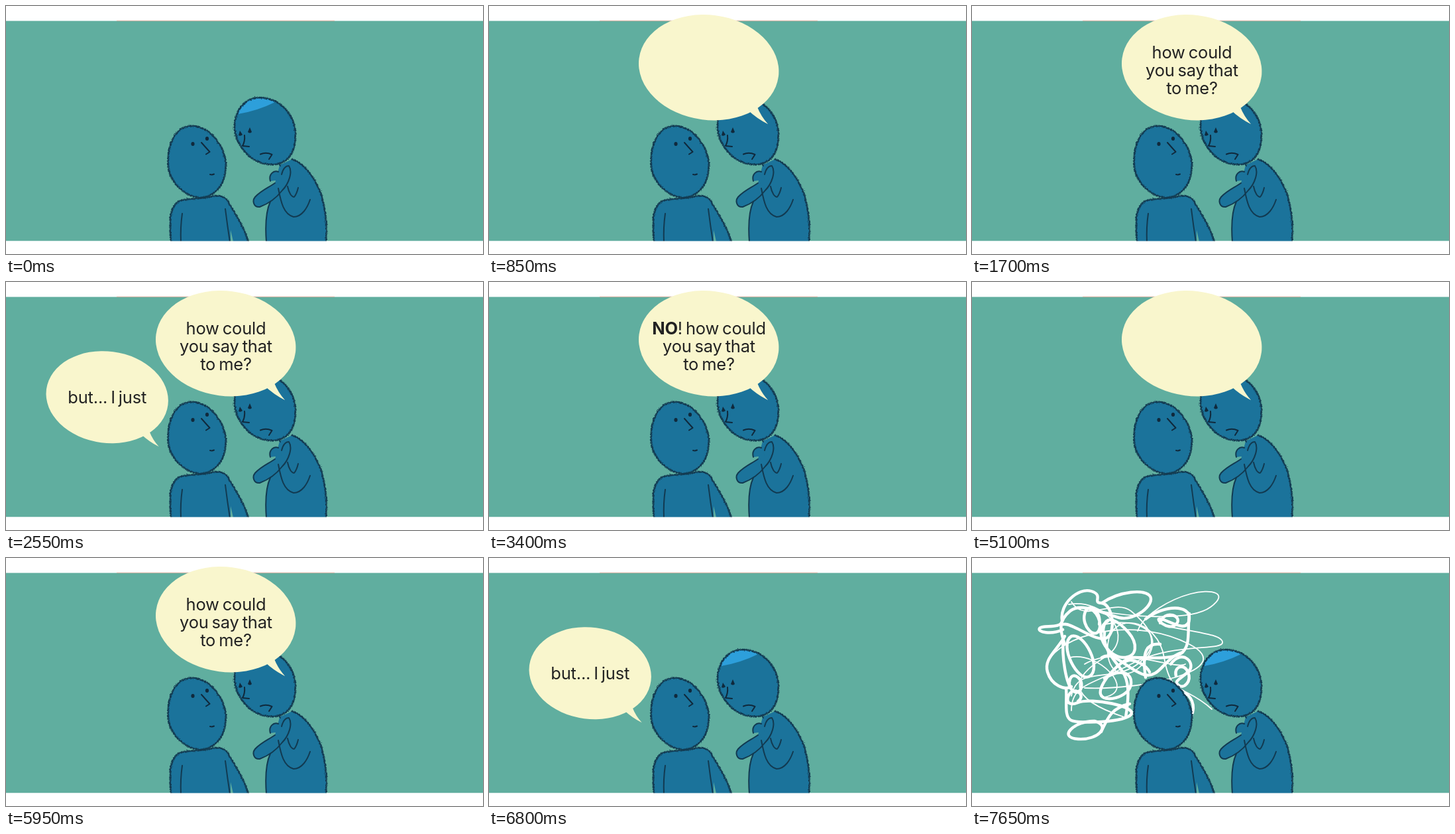
An HTML page that plays this animation: 720 by 374 pixels, repeating every 8 s.

```html
<!DOCTYPE html>
<html lang="en">
<head>
<meta charset="utf-8">
<title>Conversation</title>
<style>
  html, body { margin: 0; width: 100%; height: 100%; overflow: hidden; background: #fff; }
  svg { display: block; width: 100vw; height: 100vh; }
  text {
    font: 25.5px Inter, "Liberation Sans", sans-serif;
    letter-spacing: -.2px; word-spacing: -2px;
    fill: #222; text-anchor: middle;
  }
  .bold { font-weight: 700; }
  .skin { fill: #1b739b; }
  .line { fill: none; stroke: #123a51; stroke-linecap: round; stroke-linejoin: round; }
  .face { fill: none; stroke: #10293c; stroke-width: 2; stroke-linecap: round; stroke-linejoin: round; }
  .dot { fill: #10293c; }
  #scribble path { fill: none; stroke: #fff; stroke-linecap: round; stroke-linejoin: round; }
</style>
</head>
<body>
<svg viewBox="0 0 720 374" preserveAspectRatio="none">
  <defs>
    <filter id="pencil" filterUnits="userSpaceOnUse" x="225" y="120" width="275" height="254">
      <feTurbulence type="fractalNoise" baseFrequency=".45" numOctaves="2" seed="4" result="noise"/>
      <feDisplacementMap in="SourceGraphic" in2="noise" scale="2.5" xChannelSelector="R" yChannelSelector="G" result="rough"/>
      <feColorMatrix in="noise" values="0 0 0 0 0  0 0 0 0 0  0 0 0 0 0  0 0 4 0 -1.4" result="grain"/>
      <feComposite in="rough" in2="grain" operator="in"/>
    </filter>
    <g id="bubble" fill="#f9f6cd">
      <ellipse rx="106.1" ry="79.2" transform="rotate(7.4)"/>
      <path d="M60 65Q72 76.500 89.500 85.500Q79 74 73 59Z"/>
    </g>
    <path id="headL" d="M280 181C256 181 244.500 208 244.500 235C244.500 267 272 289 296 289C319 286 332 266 332 238C330 212 309 181 280 181Z"/>
    <path id="headR" d="M383 138C361 138 346 156 345 180C345 207 367 239 402 239C424 239 437 222 437 196C437 165 415 139 383 138Z"/>
    <path id="bodyL" d="M249 356C247 325 245 301 264 293C278 290 300 291 312 287C326 284 333 289 338 300C350 320 360 335 366 356"/>
    <path id="bodyR" d="M393 356C391 330 392 310 399 294L413 240L432 231C452 238 468 262 476 285C483 310 485 335 483 356"/>
    <path id="back" d="M432 231C452 238 468 262 476 285C483 310 485 335 483 356"/>
    <path id="arm" d="M416 254C418 246 422 241 427 241C433 250 427 268 417 278C407 291 394 299 383 303C374 304 371 294 376 288C385 278 396 274 406 267"/>
  </defs>

  <rect width="720" height="374" fill="#fff"/>
  <rect y="22.500" width="720" height="332" fill="#60ae9f"/>
  <path d="M167 22.300H496" stroke="#d9a08c" stroke-width=".8"/>

  <g id="scribble">
    <g stroke-width="4.400"></g>
    <g stroke-width="1.800"></g>
  </g>

  <g class="skin">
    <use href="#bodyL"/><use href="#headL"/><use href="#bodyR"/><use href="#headR"/><use href="#arm"/>
    <path d="M399 264C396 254 404 247 411 250L416 262Z"/>
  </g>
  <path d="M339 338L343 355H339Z" fill="#60ae9f"/>
  <path d="M350 163C356 146 369 138 383 138Q397 139 406 145Q380 158 350 163Z" fill="#2d9fdb"/>

  <g class="line" stroke-width="3.400" filter="url(#pencil)">
    <use href="#headL"/><use href="#headR"/><use href="#bodyL"/><use href="#back"/>
  </g>
  <g class="line" stroke-width="1.500">
    <use href="#headL"/><use href="#headR"/><use href="#bodyL"/><use href="#back"/>
  </g>
  <g class="line" stroke-width="2">
    <use href="#arm"/>
    <path d="M393 356C391 330 392 310 399 295M414 241L412 238"/>
    <path d="M399 264C396 254 404 247 411 250"/>
    <path d="M266 313Q263 334 264 356M331 306Q334 330 338 356M411 275C415 296 419 314 434 318C447 318 455 304 459 292M425 272C427 282 431 288 435 288Q439 283 441 274"/>
  </g>

  <g class="face">
    <path d="M295 206L307.500 220L302 223.500M308 254Q311 255 314 253.500"/>
    <path d="M360 195Q361 204 357 211L367 212M384 223.500C390 221 397 222 401.500 224L397 231"/>
  </g>
  <g class="dot">
    <ellipse cx="282" cy="208" rx="2.600" ry="3"/>
    <ellipse cx="303.500" cy="200" rx="2.600" ry="3"/>
    <path d="M353 188L351 195Q354 197 357 194ZM368 183L365 190Q368 193 371 190Z"/>
  </g>
  <rect y="354.500" width="720" height="20" fill="#fff"/>

  <g id="right">
    <use href="#bubble" transform="translate(331.700 92.700)"/>
    <g id="question">
      <text x="332" y="79"><tspan id="no"><tspan class="bold">NO</tspan>! </tspan>how could</text>
      <text x="332" y="106">you say that</text>
      <text x="332" y="133">to me?</text>
    </g>
  </g>
  <g id="left">
    <use href="#bubble" transform="translate(152.700 173.700) scale(.872)"/>
    <text x="152.700" y="183">but... I just</text>
  </g>
</svg>
<script>
  const LOOP = 8000;
  const $ = id => document.getElementById(id);

  const thick = [
    "M137 108C120 116 98 112 102 106S136 108 136 94C132 70 160 44 180 50S180 68 196 68C222 50 262 46 269 58S246 96 222 90S165 66 148 80S132 108 140 130",
    "M138 120C135 150 142 190 152 200S172 190 160 180S142 192 152 200",
    "M140 118C128 140 108 152 114 172S140 200 150 194",
    "M150 118C130 130 160 190 178 178S170 112 150 118",
    "M192 100C196 80 175 65 170 84S186 124 192 108S180 70 172 78",
    "M205 95C180 110 205 150 228 150S250 128 236 112S200 80 198 110",
    "M262 92C290 70 330 70 328 92S300 96 286 92S296 112 308 100S290 76 284 98",
    "M328 84C325 110 330 130 318 142S262 150 244 150S190 190 194 205S238 210 240 190S220 168 200 182",
    "M262 180C256 140 264 128 284 130M232 156C240 150 262 160 268 172",
    "M300 160C318 135 340 160 326 172S304 186 312 192S332 186 326 172S304 164 308 178",
    "M142 196C144 215 138 240 150 245S230 248 240 236S180 210 160 218S142 208 150 202S172 208 160 216",
    "M185 246C210 252 192 275 160 273S155 245 185 246M195 262C205 240 212 225 238 220",
    "M138 100C150 96 190 130 204 120S212 70 196 68",
    "M200 112C196 140 222 160 230 176S236 215 232 240",
    "M196 150C214 138 236 170 260 176S290 150 318 142",
    "M322 204C335 212 338 230 328 242"
  ];
  const thin = [
    "M166 74C230 90 330 96 360 74S360 46 330 54S260 84 250 110",
    "M300 104C340 112 380 116 378 128S300 128 240 160S150 190 150 230",
    "M200 100C250 90 290 110 265 150S200 180 205 130S280 90 290 150S320 190 362 228",
    "M170 160C220 130 310 170 322 160",
    "M146 70C200 60 250 120 200 150S140 210 230 240",
    "M148 150C190 140 250 200 200 210",
    "M150 66C170 100 215 60 240 80S290 130 250 160S160 160 150 208",
    "M118 150C150 110 250 90 328 130S250 200 170 196"
  ];
  const paths = list => list.map(d => `<path d="${d}"/>`).join("");
  const [bold, fine] = $("scribble").children;
  bold.innerHTML = paths(thick);
  fine.innerHTML = paths(thin);

  // Start time and the parts that are visible from then on
  const scenes = [
    [0, ""],
    [850, "right"],
    [1700, "right question"],
    [2550, "right question left"],
    [3400, "right question no"],
    [5100, "right"],
    [5950, "right question"],
    [6800, "left"],
    [7650, "scribble"]
  ];
  const parts = ["right", "question", "no", "left", "scribble"];

  function draw(t) {
    const shown = scenes.findLast(([start]) => start <= t)[1].split(" ");
    for (const id of parts) $(id).style.display = shown.includes(id) ? "" : "none";
  }

  const begin = performance.now();
  function tick() {
    draw((performance.now() - begin) % LOOP);
    requestAnimationFrame(tick);
  }
  tick();
</script>
</body>
</html>
```
